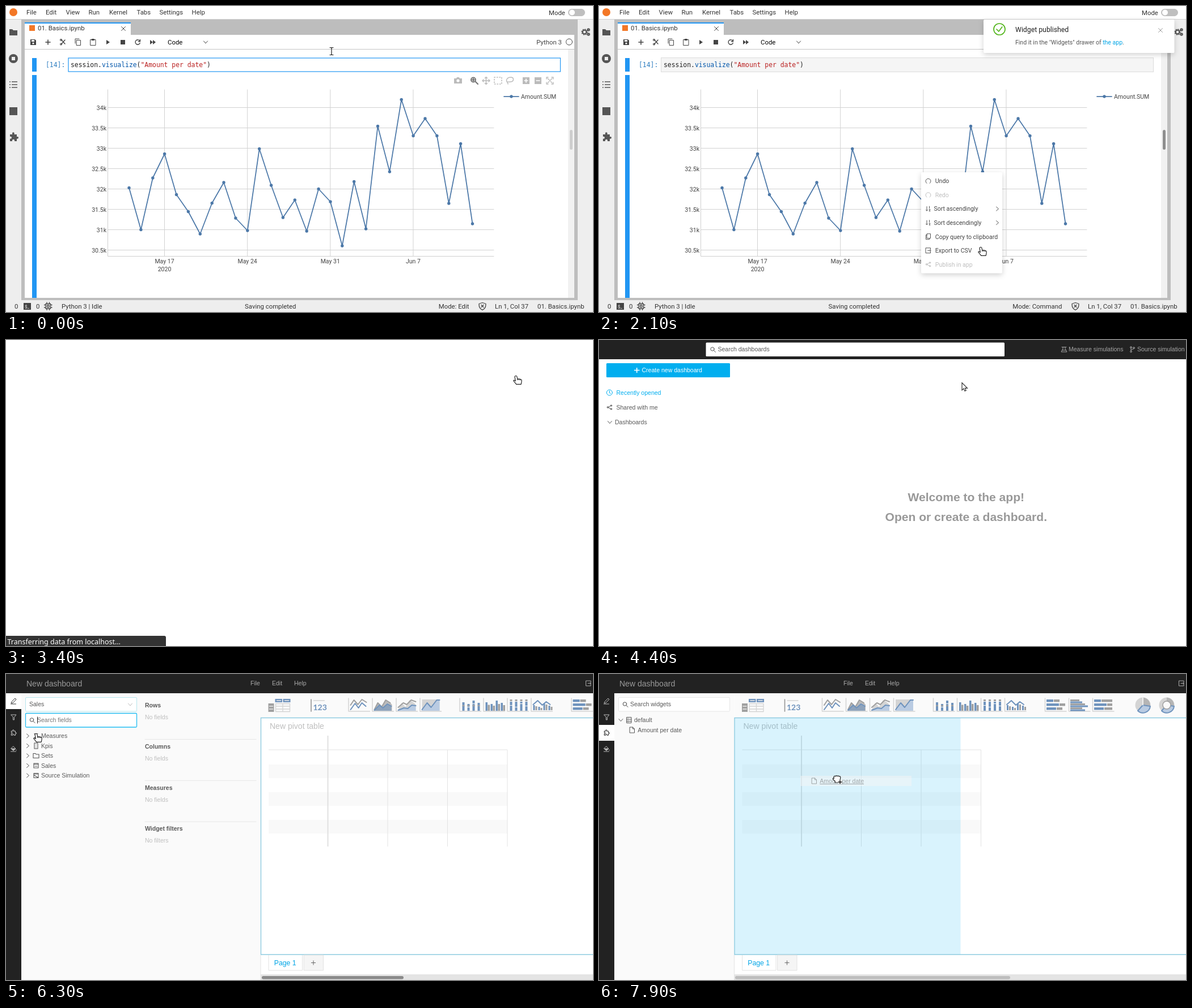
An HTML page for the animation above (8 s loop, 1035x541 px).

```html
<!DOCTYPE html>
<html lang="en">
<head>
<meta charset="utf-8">
<title>Publish a chart</title>
<style>
html, body { margin: 0; width: 100%; height: 100%; overflow: hidden; background: #fff; }
svg { display: block; }
text { white-space: pre; }
.nb { font: 11.4px Roboto, sans-serif; fill: #333; }
.small { font-size: 10.52px; }
.mid { font-size: 12.28px; }
.big { font-size: 14.03px; }
.app { font: 10.52px "Liberation Sans", Arial, sans-serif; fill: #595959; }
.code { font: 11.4px "DejaVu Sans Mono", monospace; fill: #222; }
.bold { font-weight: 700; }
.end { text-anchor: end; }
.center { text-anchor: middle; }
.faint { fill: #bfbfbf; }
.line { fill: none; stroke: currentColor; stroke-linecap: round; stroke-linejoin: round; }
.shadow { filter: drop-shadow(0 3px 5px rgba(0, 0, 0, .18)); }
</style>
</head>
<body>
<svg id="stage" width="1035" height="541" viewBox="0 0 1035 541">
<defs>
  <g id="search"><path class="line" d="M1.4 1.4 4.5 4.5"/><circle class="line" cx="-1" cy="-1" r="3.2"/></g>
  <path id="right" class="line" d="M-2-3.5 2 0-2 3.5"/>
  <path id="down" class="line" d="M-3.5-2 0 2 3.5-2"/>
  <path id="close" class="line" d="M-3.5-3.5 3.5 3.5M-3.5 3.5 3.5-3.5"/>
  <path id="puzzle" d="M-7-4h4.3c-2-5 5-5 3.2 0H5v4.4c4-2 4 4.6 0 3.2V8H1c1-4.4-5-4.4-4 0h-4V3.5c4 1.4 4-5 0-3.6z"/>
  <g id="share" class="line"><path d="M3-3-3 0 3 3"/><circle cx="3" cy="-3" r="1.2"/><circle cx="-3" cy="0" r="1.3"/><circle cx="3" cy="3" r="1.2"/></g>
  <path id="file" class="line" d="M-4-5H1L4-2V5H-4zM1-5v3h3"/>
  <path id="exit" class="line" d="M4-2V-4.500H-4.500V4.500H4V2M-1 0H4.500M3-1.500 4.500 0 3 1.500"/>
  <g id="hand" fill="#fff" stroke="#222" stroke-width="1.2" stroke-linejoin="round">
    <path d="M-3.600-7.500c1.500-.5 2.300.4 2.500 1.300l.8 3.800c3 .1 6.500.4 7.200 2 .7 1.700 0 4.800-.8 7.700h-8.300c-1.400-2-3.600-4.200-5-6.300.5-1.500 2.300-.8 3.500.7l-1.200-7.300c-.2-1 .3-1.700 1.300-1.900z"/>
    <path d="M-.3-2.400V0M2.200-2V0M4.600-1.600V.2" fill="none"/>
  </g>
  <g id="grab" fill="#fff" stroke="#222" stroke-width="1.2" stroke-linejoin="round">
    <path d="M-5-4.500c1-1.600 2.400-1.300 3-.6.8-1.400 2.600-1.200 3.200-.2 1-1 2.500-.6 3 .4 1.300-.7 2.600 0 2.600 1.600 0 2.600-.6 4.600-1.600 6V6h-8V3.500C-4.500 2-7 .5-6.600-1.200c.3-.9 1.200-.8 2-.2z"/>
  </g>
  <g id="grabmove"><use href="#grab"/><path d="M6 1.500v7M2.500 5h7" stroke="#fff" stroke-width="3.500"/><path d="M6 1.500v7M2.500 5h7" stroke="#111" stroke-width="1.400"/></g>
  <path id="ibeam" class="line" stroke-width="1.2" d="M-3-6.500H-1L0-5.500 1-6.500H3M0-5.500V5.500M-3 6.500H-1L0 5.500 1 6.500H3"/>
  <path id="cross" class="line" stroke-width="1.2" d="M-7 0H7M0-7V7"/>
  <path id="arrow" fill="#fff" stroke="#222" stroke-width="1.1" d="M-4-7V6L-1 3.200 1 7.500 3.200 6.500 1.400 2.500H5.500z"/>
  <g id="busy"><circle r="7.300" fill="#222" stroke="#fff" stroke-width="1"/><circle r="4" fill="none" stroke="#ddd" stroke-width="1.400"/><path d="M-2.800 2.800 2.800-2.800" stroke="#ddd" stroke-width="1.800"/></g>
</defs>
<rect width="1035" height="541" fill="#fff"/>

<g class="nb" data-on="0-2900">
  <path d="M27 23H1008V520H27z" fill="#bdbdbd"/>
  <path d="M0 24H27V520H1035V541H0zM1008 24H1035V520H1008z" fill="#eee"/>
  <path d="M0 23.500H1035" stroke="#d0d0d0"/>
  <path d="M33 30H220V51H1002V516H33z" fill="#fff"/>
  <path d="M33 29H220V31H33z" fill="#2196f3"/>
  <circle cx="13" cy="11" r="7" fill="#f37726"/>
  <rect x="41" y="34" width="10" height="10" fill="#f37726"/>
  <g id="menubar"></g>
  <text x="957" y="15.500">Mode</text>
  <rect x="991" y="5" width="30" height="13" rx="6.500" fill="#bfbfbf"/><circle cx="998" cy="11.500" r="5" fill="#fff"/>
  <text x="56" y="42.500">01. Basics.ipynb</text>
  <use href="#close" x="207" y="40" color="#444"/>

  <g fill="#555" color="#555">
    <path d="M6 41h5l2 2h7v9H6z"/>
    <circle cx="13" cy="93" r="8"/><rect x="10" y="90" width="6" height="6" fill="#eee"/>
    <path d="M6 134h2m2 0h10M6 139h2m2 0h10M6 144h2m2 0h10" stroke="#555" stroke-width="1.700"/>
    <rect x="6" y="179" width="14" height="14"/>
    <use href="#puzzle" x="14" y="231"/>
    <g fill="none" stroke="#555" stroke-width="2.200"><circle cx="1020" cy="46" r="3.400"/><circle cx="1027" cy="42" r="1.700"/><circle cx="1027" cy="50" r="1.700"/></g>
    <circle cx="1020" cy="46" r="5" fill="none" stroke="#555" stroke-width="1.500" stroke-dasharray="2 1.900"/>
  </g>
  <g fill="#444" color="#444">
    <path d="M43 59h8l2 2v8H43zM45 60v3h5v-3z" fill-rule="evenodd"/><circle cx="48" cy="66" r="1.600" fill="#fff"/>
    <path class="line" stroke-width="1.600" d="M70 64h8M74 60v8"/>
    <path class="line" stroke-width="1.400" d="M97 59l7 8M97 68l7-8"/><g class="line"><circle cx="97" cy="60" r="1.600"/><circle cx="97" cy="67.500" r="1.600"/></g>
    <path class="line" d="M122 66v-8h7M124.500 60.500h7v9h-7z"/>
    <path class="line" d="M149 59.500h9v10h-9zM151.500 58.500h4v2h-4z"/>
    <path d="M177 60l6 4-6 4zM202 60h8v8h-8zM254 60l5 4-5 4zM259 60l5 4-5 4z"/>
    <path class="line" stroke-width="1.400" d="M236 62a4.200 4.200 0 1 0 .2 3.500M236.500 59.500v3.200h-3.200"/>
    <text x="285" y="67.500" fill="#000">Code</text><use href="#down" x="352" y="64"/>
    <text x="980" y="68" class="end">Python 3</text><circle class="line" cx="993" cy="63.500" r="5.500"/>
  </g>
  <path d="M33 76.500H1002" stroke="#c4c4c4"/>

  <path d="M46 92h8v24h-8zM46 122h8v394h-8z" fill="#2196f3"/>
  <text class="code" x="70" y="108" style="fill:#307fc1">[14]:</text>
  <rect data-on="0-900" x="110" y="92" width="867.500" height="24" fill="#fff" stroke="#2196f3" stroke-width="1.200"/>
  <rect data-on="900-2900" x="109.500" y="91.500" width="868" height="25" fill="#f5f5f5" stroke="#dcdcdc"/>
  <text class="code" x="114" y="108">session.<tspan fill="#0055aa">visualize</tspan>(<tspan fill="#ba2121">"Amount per date"</tspan>)</text>
  <path d="M991 77h11v439h-11z" fill="#f1f1f1"/>
  <rect data-on="0-900" x="994" y="219" width="5" height="35" rx="2.500" fill="#cdcdcd"/>
  <rect data-on="900-2900" x="994" y="219" width="5" height="35" rx="2.500" fill="#8e8e8e"/>

  <g id="chart" class="nb small" style="fill:#444"></g>
  <g data-on="0-1200" color="#bbb" fill="#bbb">
    <path d="M790 128h4l1-2h4l1 2h4v9h-14z"/><circle cx="797" cy="132" r="2.600" fill="#fff"/>
    <g color="#777"><circle class="line" cx="824" cy="130.500" r="4" stroke-width="2"/><path class="line" stroke-width="2.200" d="M828 134l4 4M822 130.500h4M824 128.500v4"/></g>
    <path class="line" stroke-width="1.500" d="M840 132h13M846.500 125.500v13M842 130l-2 2 2 2M851 130l2 2-2 2M844.500 127.500l2-2 2 2M844.500 136.500l2 2 2-2"/>
    <path class="line" stroke-width="1.600" stroke-dasharray="1.500 3" d="M861 126h13v12h-13z"/>
    <path class="line" stroke-width="1.500" d="M884 135c-4-5 1-9 6-9 6 0 6 7 0 8-3 .5-6-.5-6 1s2 2 1 3"/>
    <path d="M911 126h12v12h-12zM932 126h12v12h-12z"/>
    <path d="M913.500 132h7M917 128.500v7M934.500 132h7" stroke="#fff" stroke-width="1.700"/>
    <path class="line" stroke-width="1.400" d="M953 129v-3h3M962 126h3v3M965 135v3h-3M956 138h-3v-3M955 128l8 8M963 128l-8 8"/>
  </g>

  <g fill="#333" color="#444">
    <text x="15" y="534.500">0</text><rect x="31" y="525" width="13" height="12" fill="#444"/><text x="33" y="534" style="fill:#fff;font-size:8px">$_</text>
    <text x="53" y="534.500">0</text>
    <path class="line" stroke-width="1.300" d="M70 526.500h8.500v8.500H70zM72.500 529h3.500v3.500h-3.500zM72 524v2M76.500 524v2M72 535.500v2M76.500 535.500v2M67.500 528.500h2M67.500 533h2M79 528.500h2M79 533h2"/>
    <text x="98" y="534.500">Python 3 | Idle</text>
    <g data-on="0-900"><text x="421" y="534.500">Saving completed</text><text class="end" x="816.500" y="534.500">Mode: Edit</text></g>
    <g data-on="900-2900"><text x="404.500" y="534.500">Saving completed</text><text class="end" x="816.500" y="534.500">Mode: Command</text></g>
    <path class="line" stroke-width="1.300" d="M834 526.500l6-2 6 2c0 6-1 8-6 11-5-3-6-5-6-11zM838 528.500l4 4M842 528.500l-4 4"/>
    <text x="862" y="534.500">Ln 1, Col 37</text><text x="937" y="534.500">01. Basics.ipynb</text>
  </g>

  <g data-on="1200-2900" class="nb small">
    <rect class="shadow" x="568" y="294" width="143" height="178.500" rx="2" fill="#fff"/>
    <g id="menu"></g>
  </g>
  <g id="note" data-on="1900-2900">
    <rect class="shadow" x="678" y="24" width="336.500" height="59" rx="2" fill="#fff"/>
    <g color="#52b51b" stroke-width="1.700"><circle class="line" cx="706" cy="41" r="10"/><path class="line" d="M701 41l3.800 4 6-8"/></g>
    <text class="mid" x="734" y="45.500" fill="#222">Widget published</text>
    <text class="small" x="734" y="67.500" fill="#555">Find it in the "Widgets" drawer of <tspan fill="#00a5e6">the app</tspan>.</text>
    <use href="#close" x="990" y="43" color="#999"/>
  </g>
</g>

<g data-on="3100-3600">
  <path d="M0 523H279q3 0 3 3V541H0z" fill="#333"/>
  <text x="2.500" y="537.500" fill="#fff" style="font:12.5px 'Noto Sans',sans-serif">Transferring data from localhost…</text>
</g>

<g class="app" data-on="3800-5600">
  <path d="M0 0H1035V34H0z" fill="#222"/>
  <rect x="188.500" y="4.500" width="526.500" height="24.500" rx="1.500" fill="#fff"/>
  <use href="#search" x="201" y="17" color="#555"/><text x="209.500" y="20.300">Search dashboards</text>
  <g color="#a6a6a6" fill="#a6a6a6">
    <path class="line" d="M816 12.500h8M818 12.500v3l-3 5.500h10l-3-5.500v-3M817 18h6"/><text x="828" y="20.300">Measure simulations</text>
    <path class="line" d="M938 14v5M943 15c0 2-4 1-5 3"/><g class="line"><circle cx="938" cy="13" r="1.400"/><circle cx="938" cy="20.500" r="1.400"/><circle cx="943" cy="14" r="1.400"/></g><text x="949" y="20.300">Source simulation</text>
  </g>
  <rect data-on="3800-5200" x="13" y="41" width="218" height="25" rx="1.500" fill="#00aeef"/>
  <rect data-on="5200-5600" x="13" y="41" width="218" height="25" rx="1.500" fill="#26c6fd"/>
  <path d="M62 53.500h9.500M66.700 49v9" stroke="#fff" stroke-width="1.600"/><text x="75.500" y="57.300" fill="#fff">Create new dashboard</text>
  <g color="#00aeef" fill="#00aeef"><circle class="line" cx="18.500" cy="93" r="5"/><path class="line" d="M18.500 90v3.500l2 1.200"/><text x="30.500" y="96.800">Recently opened</text></g>
  <use href="#share" x="18.500" y="119" color="#555"/><text x="30.500" y="123">Shared with me</text>
  <use href="#down" x="19" y="145.500" color="#555"/><text x="28" y="149.300">Dashboards</text>
  <g class="center bold" fill="#999" style="font-size:21.05px"><text x="647.300" y="285">Welcome to the app!</text><text x="647.300" y="320">Open or create a dashboard.</text></g>
</g>

<g class="app" data-on="5600-8000">
  <path d="M27 34H1035V78H449V541H27z" fill="#fafafa"/>
  <g id="board">
    <path d="M238.500 34H1246V541H238.500z" fill="#fff"/>
    <path d="M238.500 34H1246V77H238.500z" fill="#fafafa"/>
    <g id="types"></g>
    <path d="M252.500 160h421v24h-421zM252.500 209h421v24h-421zM252.500 258h421v24h-421z" fill="#f9f9f9"/>
    <path d="M252.500 134H673.500M462.500 134V305M568 134V305M673.500 134V305" stroke="#e3e3e3"/>
    <path d="M357 109V305" stroke="#e0e0e0" stroke-width="2"/>
    <text class="big" x="254.500" y="96.500" fill="#bfbfbf">New pivot table</text>
    <path data-on="7800-8000" d="M239 78H637.500V496H239z" fill="#00aeef" opacity=".15"/>
    <path d="M1300 77.500H239V496H1300" fill="none" stroke="#8fcbe0" stroke-width="1.400"/>
    <path d="M238.500 497V541" stroke="#e4e4e4"/>
    <path d="M252.500 497V524H312V497" fill="#fff" stroke="#e2e2e2"/><path d="M314.500 497V524H349V497z" fill="#f5f5f5" stroke="#e2e2e2"/>
    <text class="mid" x="262.300" y="514.500" fill="#00a5e6">Page 1</text><path d="M327.500 510.500h8M331.500 506.500v8" stroke="#666"/>
    <path d="M238.500 531H1246V541H238.500z" fill="#e4e4e4"/>
  </g>
  <rect data-on="5600-6800" x="451" y="534" width="250" height="5.500" rx="2.700" fill="#8a8a8a"/>
  <rect data-on="6800-7800" x="240" y="534" width="485" height="5.500" rx="2.700" fill="#8a8a8a"/>
  <rect data-on="7800-8000" x="240" y="534" width="485" height="5.500" rx="2.700" fill="#bdbdbd"/>

  <path d="M0 0H1035V34H27V541H0z" fill="#222"/>
  <g fill="#aaa" color="#aaa"><text class="big" x="36" y="22" fill="#999">New dashboard</text>
    <text x="431" y="20.300">File</text><text x="469" y="20.300">Edit</text><text x="508" y="20.300">Help</text><use href="#exit" x="1027" y="16.500"/></g>
  <rect data-on="5600-6900" y="34" width="27" height="28" fill="#fff"/><rect data-on="6900-8000" y="90" width="27" height="28" fill="#fff"/>
  <g color="#bbb">
    <path id="pencil" class="line" d="M10 49l6-6 2 2-6 6-2.500.5zM8.500 53h9"/>
    <path class="line" d="M9 72h9l-3.500 4.500V81h-2v-4.500z"/>
    <use id="piece" href="#puzzle" class="line" transform="translate(13.500 103.500) scale(.6)" stroke-width="1.700"/>
    <path class="line" d="M13 128l4 4-4 3.500-4-3.500zM9 132h7M8.500 137h9M18 134v1"/><path d="M9 132h8l-4 3.500z" fill="#bbb"/>
  </g>

  <g data-on="5600-6800">
    <g id="sections"></g>
    <g data-on="6000-6800">
      <rect x="34.500" y="41.500" width="196" height="24.500" rx="1.500" fill="#fff" stroke="#b5e6ee"/><text x="41" y="57.300">Sales</text><use href="#down" x="219" y="54" color="#bbb"/>
      <rect x="34.500" y="69.500" width="196" height="24.500" rx="1.500" fill="#fff" stroke="#22bdf2" stroke-width="1.300"/>
      <use href="#search" x="46.500" y="82" color="#444"/><path d="M55.500 75.500v12" stroke="#222"/><text x="55" y="85.300" fill="#777">Search fields</text>
      <g id="fields"></g>
    </g>
  </g>
  <g data-on="6800-8000" color="#555">
    <rect x="34.500" y="41.500" width="196" height="24.500" rx="1.500" fill="#fff" stroke="#e6e6e6"/>
    <use href="#search" x="46.500" y="54" color="#444"/><text x="55" y="57.300">Search widgets</text>
    <g data-on="6900-8000">
      <rect data-on="7200-7800" x="34" y="90" width="197" height="18" fill="#f3f3f3"/>
      <use href="#down" x="38.500" y="81.500"/><path class="line" d="M49 76.500h8v10h-8zM49 80h8M49 83.500h8M51 78.300h.2M51 81.800h.2M51 85h.2"/><text x="62" y="85.300">default</text>
      <use href="#file" x="58.500" y="99"/><text x="68.300" y="102.800">Amount per date</text>
      <path data-on="7200-7800" d="M68.300 104.500H146" stroke="#595959"/>
    </g>
  </g>
  <g id="ghost" data-on="7800-8000" color="#555">
    <rect x="34" y="90" width="196" height="18" fill="#f5f5f5" opacity=".5"/>
    <g opacity=".5"><use href="#file" x="58.500" y="99"/><text x="68.300" y="102.800">Amount per date</text><path d="M68.300 104.500H146" stroke="#595959"/></g>
  </g>
</g>
<use id="cursor" color="#222"/>
</svg>
<script>
const $ = id => document.getElementById(id);
const fill = (id, html) => { $(id).innerHTML = html; };
const text = (x, y, s, cls = '') => `<text x="${x}" y="${y}" class="${cls}">${s}</text>`;
const path = (d, color, w = 1) => `<path class="line" d="${d}" color="${color}" stroke-width="${w}"/>`;
const area = (d, color, o = 1) => `<path d="${d}" fill="${color}" opacity="${o}"/>`;

const tabs = { File: 36, Edit: 70, View: 105.500, Run: 145.500, Kernel: 182, Tabs: 230.500, Settings: 270.500, Help: 327.500 };
fill('menubar', Object.entries(tabs).map(([s, x]) => text(x, 15.300, s)).join(''));

// Line chart, one point per day
const days = [321.5, 395.5, 304, 261.5, 333.5, 363.5, 403, 348.5, 312, 375, 397, 252.5, 317, 374, 343,
  398, 323.5, 346, 424, 310.5, 394, 212.5, 293, 165.5, 229.5, 199, 229.5, 349, 243.5, 385];
const points = days.map((y, i) => [+(217 + i * 20.88).toFixed(1), y]);
const blue = '#4c78a8';
let chart = path('M179.500 148V442.500H860', '#cfcfcf');
for (let i = 0; i < 8; i++) {
  const y = 179.500 + i * 36;
  chart += path(`M180 ${y}H860`, '#d2d2d2') + text(177, y + 4.200, `${34 - i / 2}k`, 'end');
}
['May 17', 'May 24', 'May 31', 'Jun 7'].forEach((s, i) => {
  const x = 279.500 + i * 146.150;
  chart += path(`M${x} 148V442`, '#d2d2d2') + text(x, 455, s, 'center');
});
chart += text(279.500, 469, '2020', 'center') + path('M' + points.join('L'), blue, 1.750) + path('M878 160H904', blue, 1.750);
chart += [...points, [891, 160]].map(([x, y]) => `<circle cx="${x}" cy="${y}" r="2.700" fill="${blue}"/>`).join('');
fill('chart', chart + text(908, 164, 'Amount.SUM'));

// Context menu
const round = 'M-2.500 4A4.500 4.500 0 1 1 2.500 4';
const sort = 'M-2.500-4V3.500M-4 2-2.500 3.500-1 2M2-4.500V-1M1.500 1H3.500L1.500 4H3.500';
const menu = [['Undo', round], ['Redo', round], ['Sort ascendingly', sort], ['Sort descendingly', sort],
  ['Copy query to clipboard', 'M-2-5H4V3H-2zM-2-3H-4V5H2V3'], ['Export to CSV', ''], ['Publish in app', '']];
fill('menu', menu.map(([s, d], i) => {
  const ref = { 5: 'exit', 6: 'share' }[i];
  const icon = ref ? `<use href="#${ref}"/>` : `<path class="line" d="${d}"/>`;
  const arrow = d === sort ? '<use href="#right" x="122"/>' : '';
  const off = i === 1 ? 'fill="#bfbfbf" color="#bfbfbf"' : 'fill="#444" color="#555"';
  return `<g id="item${i}" ${off} transform="translate(580.500 ${309.500 + i * 24.550})">${icon}${arrow}${text(d === sort ? 10 : 12.300, 3.800, s)}</g>`;
}).join(''));

// Query editor
fill('sections', ['Rows', 'Columns', 'Measures', 'Widget filters'].map((s, i) => {
  const y = 59 + i * 72.800;
  return text(245, y, s, 'bold') + text(245, y + 21, i < 3 ? 'No fields' : 'No filters', 'faint') +
    (i < 3 ? path(`M245 ${y + 56.500}H441`, '#e6e6e6') : '');
}).join(''));
const glyphs = ['M3-4H-3L1 0-3 4H3', 'M-3-5H3V5H-3zM0-3V-2.800M0 0V.2M0 3V3.200', 'M-5-4H-1L0-2.500H5V4H-5z',
  'M-4-4H4V4H-4zM-4-2.500H4M-2 1H2', 'M-4-4H4V4H-4zM-4-2.500H4M-4-1 4 4'];
fill('fields', ['Measures', 'Kpis', 'Sets', 'Sales', 'Source Simulation'].map((s, i) =>
  `<g transform="translate(0 ${109.500 + i * 17.500})" color="#555"><use href="#right" x="38.500"/>
  <g transform="translate(53 0)">${path(glyphs[i], '#555', 1.100)}</g>${text(62, 3.800, s)}</g>`).join(''));

// Chart type toolbar
const B = '#6f93bd', G = '#a0a0a0', L = '#d4d4d4';
const at = (x, s) => `<g transform="translate(${x} 43)">${s}</g>`;
const bar = (x, y, w, h, c) => area(`M${x} ${y}h${w}v${h}h${-w}z`, c);
const axes = path('M.5 0V23H38', L, 1.500);
const up = 'M4 20 10 8 17 15 24 3 32 8', low = 'M4 21 13 12 19 17 27 10 34 14', peak = 'M4 20 13 8 21 15 30 3 35 3';
const lines = [
  path('M4 12 10 3 17 11 24 2 32 7', G, 2) + path('M4 20 12 9 18 17 24 8 31 14', B, 2),
  area(up + 'L35 11V22H4z', G, .7) + area(low + 'V22H4z', B, .6) + path(up, G, 2) + path(low, B, 2),
  area(up + 'L35 11V22H4z', L) + area('M4 22 14 17 21 18 28 12 35 13V22z', '#b9cbe2') + path('M4 16 13 8 19 11 27 3 35 6', G, 2) + path('M4 21 14 17 21 18 28 12 35 13', B, 2),
  area('M4 2H35V22H4z', L) + area(peak + 'V22H4z', '#b9cbe2') + path('M4 20 13 8 20 16 30 3 35 3', B, 2)];
const cols = [0, 1, 2, 3].map(k => {
  let s = '';
  for (let i = 0; i < 4; i++) {
    const x = 5 + i * 9, h = [9, 6, 12, 8][i];
    if (k === 1) s += bar(x - 1, 19 - h - 3, 3.500, h + 6, B) + bar(x + 3, 16 - h / 2, 3.500, 6 + h / 2, G);
    else if (k === 3) s += bar(x - 1, 21 - h, 3, h, B) + bar(x + 3, 23 - h, 3, h - 2, G);
    else s += bar(x, 22 - h, 4, h, B) + bar(x, k ? 2 : 16 - h, 4, k ? 3 : 5, k ? G : B) + (k ? bar(x, 6, 4, 15 - h, B) : bar(x, 12, 4, 2, G));
  }
  return s + (k === 3 ? path('M4 11 12 4 20 12 27 6 34 11', B, 2) : '');
});
const rows = [0, 1, 2].map(k => [0, 1, 2].map(i => {
  const y = 2 + i * 7, w = [12, 22, 17][i];
  return k === 1 ? bar(3, y, w + 4, 3, G) + bar(3, y + 3.500, w + 9, 3, B)
    : bar(3, y, w, 4.500, B) + bar(4 + w, y, k ? 31 - w : 10, 4.500, G);
}).join(''));
const pie = (x, hole) => `<g transform="translate(${x} 55)"><circle r="13.500" fill="${L}"/>` +
  area('M0 0V-13.500A13.500 13.500 0 0 1 12.800 2z', G, .6) + area('M0 0 13 2A13 13 0 0 1-9 10z', '#b9cbe2') +
  path('M0 0 13 2A13 13 0 0 1-9 10z', B, 2) + (hole ? `<circle r="7" fill="#fafafa" stroke="${G}" stroke-width="1.500"/>` : path('M0 0V-13', '#fff', 1.500)) + '</g>';
const grid = bar(12, 1, 12.500, 6, B) + bar(26, 1, 13, 6, B) + bar(0, 9, 10, 15, G) + path('M2 14H8M2 19H8M15 4H22M29 4H36', '#e8e8e8', 1.500) +
  path('M13 9.500H38V23.500H13zM25.500 9.500V23.500M13 14H38M13 19H38', L, 1.300);
fill('types', at(252, grid) + path('M327.500 45V66', '#999', 1.700) + path('M332 47H351', L, 1.300) +
  `<text x="331" y="64" fill="${B}" style="font:700 14px Lato,sans-serif">123</text>` +
  lines.map((s, i) => at(393 + i * 42, axes + s)).join('') + cols.map((s, i) => at(589 + i * 42, axes + s)).join('') +
  rows.map((s, i) => at(786 + i * 42, axes + s)).join('') + pie(959) + pie(1001, true));

// Time, x, y of the pointer and its shapes
const track = [[0, 574, 80], [200, 580, 52], [400, 577, 62], [900, 568, 282], [1000, 568, 294], [1200, 570, 296],
  [1500, 622, 452], [1700, 626, 457], [1900, 630, 457], [2100, 676, 434], [2400, 868, 104], [2800, 902, 71],
  [4200, 902, 71], [4800, 128, 106], [5000, 128, 106], [5300, 124, 58], [5600, 124, 58], [5900, 112, 74],
  [6000, 98, 84], [6300, 56, 113], [6700, 16, 106], [7000, 18, 108], [7100, 18, 108], [7500, 141, 117],
  [7700, 142, 116], [7900, 419, 186]];
const shapes = [[0, 'ibeam'], [100, 'arrow'], [500, 'ibeam'], [700, 'cross'], [1200, 'arrow'], [1400, 'hand'], [2200, 'arrow'],
  [2500, 'hand'], [3600, 'arrow'], [5200, 'hand'], [5400, 'busy'], [5700, 'arrow'], [6200, 'hand'], [7700, 'grab'], [7800, 'grabmove']];

function place(t) {
  const i = track.findLastIndex(k => k[0] <= t);
  const a = track[i], b = track[i + 1] || a;
  const p = b === a ? 0 : (t - a[0]) / (b[0] - a[0]);
  return [1, 2].map(n => a[n] + (b[n] - a[n]) * p);
}
const move = (id, x, y = 0) => $(id).setAttribute('transform', `translate(${x} ${y})`);
const timed = [...document.querySelectorAll('[data-on]')].map(el => [el, ...el.dataset.on.split('-').map(Number)]);
const start = performance.now();

function draw() {
  const t = Math.floor((Math.max(0, performance.now() - start) % 8000) / 100) * 100;
  for (const [el, from, to] of timed) el.style.display = t >= from && t < to ? '' : 'none';
  const [x, y] = place(t);
  move('cursor', x, y);
  $('cursor').setAttribute('href', '#' + shapes.findLast(s => s[0] <= t)[1]);
  move('note', 336 * Math.max(0, (2100 - t) / 200) ** 2);
  move('board', t < 6800 ? 210.500 : 0);
  move('ghost', x - 98, y - 96);
  $('item6').setAttribute('fill', t < 1800 ? '#444' : '#bfbfbf');
  $('item6').setAttribute('color', t < 1800 ? '#555' : '#bfbfbf');
  $('pencil').setAttribute('color', t < 6900 ? '#333' : '#bbb');
  $('piece').setAttribute('color', t < 6900 ? '#bbb' : '#333');
  requestAnimationFrame(draw);
}
draw();
</script>
</body>
</html>
```
